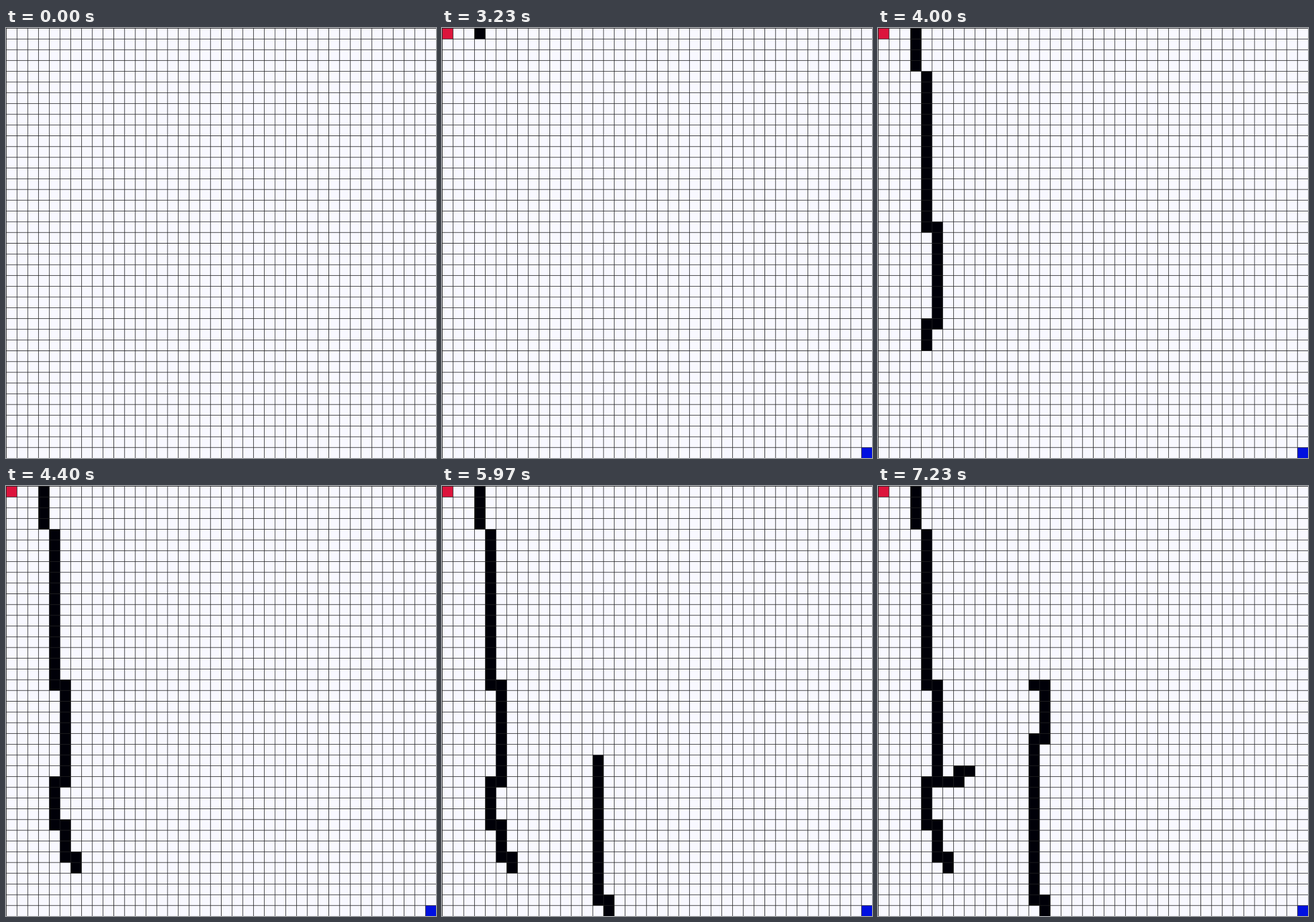
These frames come from a looping animation (748x748 px, 8000 ms). An HTML page with a canvas:

```html
<!DOCTYPE html>
<html lang="en">
<head>
<meta charset="utf-8">
<title>Grid walls</title>
<style>
html, body { margin: 0; height: 100%; overflow: hidden; background: #f8f8ff; }
canvas { display: block; width: 748px; height: 748px; }
</style>
</head>
<body>
<canvas id="stage" width="800" height="800"></canvas>
<script>
const SIZE = 800, CELL = 20, LAST = SIZE / CELL - 1, LOOP = 8000;
const ctx = document.getElementById('stage').getContext('2d');

// Pointer strokes as key points: ms, x, y (in cells)
const strokes = [
  [[3230, 3.5, 0.5], [3330, 3.6, 1.05], [3376, 4, 4], [3599, 5, 18.5], [3630, 5.2, 20.5],
   [3910, 5, 27.5], [4000, 4.8, 29.2], [4162, 5, 31.5], [4360, 6, 34.5], [4400, 6.1, 35.2]],
  [[5670, 15.2, 39.5], [5691, 15, 38.5], [5970, 14.6, 25.3], [6000, 14.7, 24.6],
   [6050, 15, 23.5], [6400, 15.1, 18.4], [6430, 14.9, 18.3]],
  [[7130, 6.5, 27.5], [7165, 7.5, 27], [7230, 8.1, 26.3]]
];

// Every cell the pointer crosses becomes a wall at that moment
const walls = [];
for (const points of strokes) {
  for (let i = 1; i < points.length; i++) {
    const [t0, x0, y0] = points[i - 1], [t1, x1, y1] = points[i];
    for (let t = t0; t <= t1; t++) {
      const k = (t - t0) / (t1 - t0);
      const col = Math.floor(x0 * (1 - k) + x1 * k), row = Math.floor(y0 * (1 - k) + y1 * k);
      const prev = walls.at(-1);
      if (!prev || prev.col !== col || prev.row !== row) walls.push({ t, col, row });
    }
  }
}

function fillCell(col, row, color) {
  ctx.fillStyle = color;
  ctx.fillRect(col * CELL, row * CELL, CELL, CELL);
}

function draw(ms) {
  const now = Math.floor(ms * 0.03 + 0.15) / 0.03 + 4; // 30 updates per second
  ctx.fillStyle = '#f8f8ff';
  ctx.fillRect(0, 0, SIZE, SIZE);
  if (now >= 600) fillCell(0, 0, '#dc143c');
  if (now >= 2030) fillCell(LAST, LAST, '#0010e0');
  for (const { t, col, row } of walls) if (t <= now) fillCell(col, row, '#000008');
  ctx.fillStyle = '#222';
  for (let p = 0; p < SIZE; p += CELL) {
    ctx.fillRect(p, 0, 1, SIZE);
    ctx.fillRect(0, p, SIZE, 1);
  }
}

const start = performance.now();
function loop() {
  draw((performance.now() - start) % LOOP);
  requestAnimationFrame(loop);
}
loop();
</script>
</body>
</html>
```
